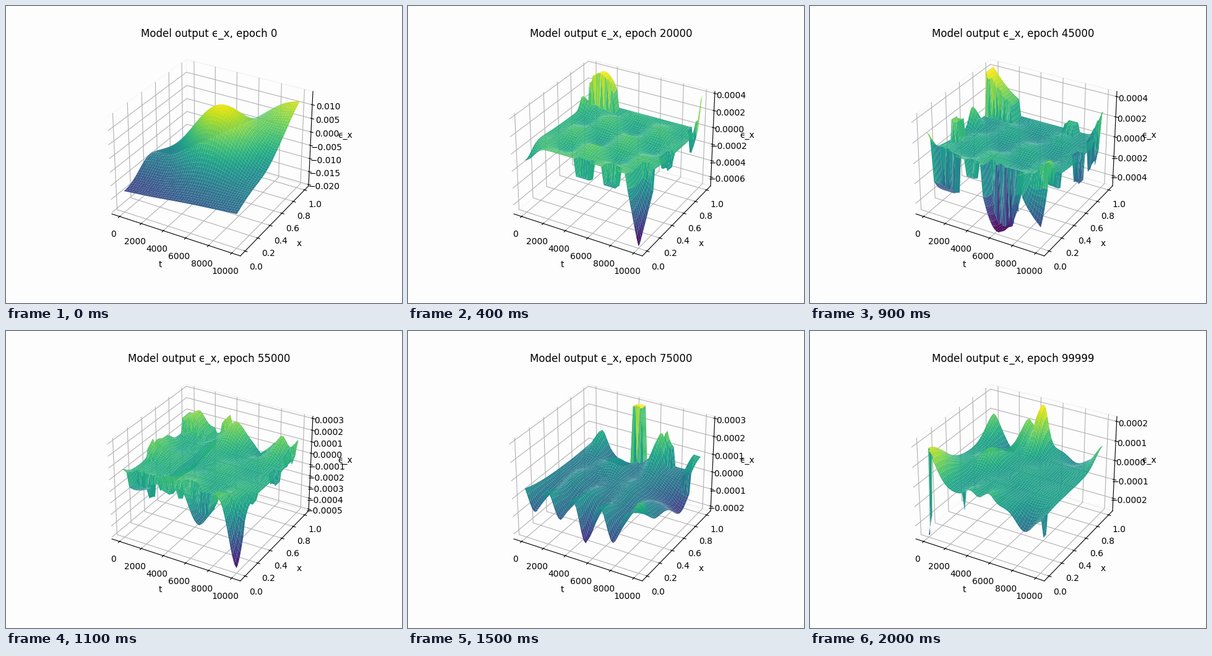
A matplotlib script that plays this animation: 640x480 px, repeating every 2100 ms.

```python
import numpy as np
import matplotlib.pyplot as plt
from matplotlib.animation import FuncAnimation

STEP, LAST, FRAMES = 5000, 99999, 21
PAPER = "#fdfdfd"
N = 51
rng = np.random.default_rng(4)

# a runs along t, b along x, heights span -1 to 1
A, B = np.meshgrid(np.linspace(-1, 1, N), np.linspace(-1, 1, N))
LIP = np.exp(-(B + 1) / 0.5)


def bump(a, b, h, wa=0.2, wb=0.25):
    return h * np.exp(-((A - a) / wa) ** 2 - ((B - b) / wb) ** 2)


def front(a, h, w=0.12):
    return bump(a, -1, h, w, 0.3)


def back(a, h, w=0.12):
    return bump(a, 1, h, w, 0.35)


def ripple(amp):
    calm = (1 - A**4) * (1 - B**4)
    return amp * np.sin(7 * A + 2 * B) * np.cos(6 * B - A) * calm


def wave(amp, crest, period):
    """Swell along t that fades away from the front edge."""
    return amp * np.cos(2 * np.pi * (A - crest) / period) * LIP


def wall(a0, a1, b0, b1):
    """Sheer block with ragged edges, open at the rim of the sheet."""
    jag = rng.uniform(-1, 1, N) * min(0.05, (b1 - b0) / 4)
    low = b0 + jag if b0 > -1 else -2
    high = b1 + jag if b1 < 1 else 2
    return (A >= a0) & (A <= a1) & (B >= low) & (B <= high)


def smooth_start():
    z = -0.25 + 0.45 * A + 0.2 * B + 0.3 * A * B
    z += bump(0, 0.12, 1.15, 0.65, 0.55) + bump(-1, -0.25, 0.38, 0.4, 0.45)
    return z + bump(1, 0, -0.25, 0.4, 0.5) + bump(0.75, 1, 0.22, 0.45, 0.4)


def towers_and_pit():
    z = 0.25 + ripple(0.14) + 0.2 * LIP
    z += bump(-1, 0.7, 0.25, 0.15, 0.1) + bump(-1, -1, -0.35)
    z += wall(-1, -0.5, 0.85, 1) * (0.72 - 6 * (A + 0.75) ** 2)
    z -= wall(0.8, 1, -1, -0.5) * (0.3 + 12 * (A - 0.8) * (-0.5 - B))
    for a in (-0.1, 0.38):
        z -= 0.37 * wall(a, a + 0.25, -1, -0.85)
    z -= 0.25 * wall(0.88, 1, -0.1, 0.1)
    return z - 0.5 * wall(0.88, 0.96, 0.85, 1) + bump(1, 1, 0.75, 0.08, 0.12)


def many_pits():
    z = 0.06 + ripple(0.1) + 0.3 * LIP + bump(-1, -1, 0.35, 0.12, 0.15)
    z += bump(-1, 0.33, 0.4, 0.15, 0.14) + bump(1, 0.95, 0.6, 0.12, 0.2)
    z += bump(1, -0.72, 0.4, 0.2, 0.15)
    z -= 0.8 * wall(-0.9, -0.5, -1, -0.8)
    z -= 0.35 * wall(-0.3, -0.15, -1, -0.85)
    z -= wall(-0.02, 0.6, -1, -0.75) * np.maximum(0, 1.35 - 10 * (A - 0.26) ** 2)
    z -= wall(0.66, 1, -1, -0.75) * np.sqrt(abs(A - 0.6) / 0.4) * (-0.6 - B) * 2.4
    z += wall(-1, -0.5, 0.75, 1) * 0.95 * np.exp(-2 * (A + 1))
    z += 0.42 * wall(-1, -0.88, -0.35, -0.12) + 0.2 * wall(0.4, 0.6, 0.8, 1)
    for b in (-0.5, 0.3, 0.85):
        z -= (0.45 + 0.3 * b) * wall(0.88, 1, b - 0.1, b + 0.08)
    return z


def long_cliff():
    z = 0.3 + ripple(0.04) + front(-0.3, 0.35, 0.3) + front(0.08, 0.45)
    z += front(0.37, -0.25) + front(0.7, 0.4) + front(1, -1.4, 0.16)
    z += bump(-1, 0, 0.4) + back(-0.8, 0.32) + back(-0.12, 0.58, 0.22)
    z += back(0.35, -0.25) + back(0.7, 0.52) + back(1, 0.25)
    z -= 0.3 * wall(-0.53, 0, -1, -0.85) + 0.22 * wall(-0.42, -0.32, -0.85, 0.7)
    return z + 0.33 * wall(-0.32, -0.22, 0.85, 1)


def tall_tower():
    z = -0.15 + ripple(0.06) + wave(0.27, -0.14, 0.46)
    z += front(0.06, -0.35) + front(0.58, -0.15) + front(1, 0.85)
    z += bump(1, 0.35, -0.45, 0.35, 0.35) + bump(-0.25, 0.5, 0.2)
    z += back(-0.8, 0.38) + back(-0.35, -0.25, 0.25) + back(0.3, 0.65)
    z += wall(-0.18, 0, 0.88, 1) * (1.3 - 12 * (A + 0.1) ** 2)
    return z + 0.4 * wall(0.38, 0.54, 0.88, 1) + 0.38 * wall(0.86, 1, 0.65, 1)


def sharp_peaks():
    z = -0.18 + ripple(0.05) + wave(0.35, -0.38, 0.48)
    z += front(0.05, 0.4) + front(-0.12, -0.15) + front(0.92, -0.35, 0.15)
    z += back(-1, 0.75, 0.15) + back(-0.73, -0.35, 0.15) + back(-0.45, 0.6)
    z += back(-0.08, 1.2) + back(0.35, 0.2, 0.15) + back(1, 0.45)
    return z + bump(0.85, 0.6, -0.65, 0.12, 0.15) + bump(-0.6, 0.1, 0.35)


def thin_spikes():
    z = 0.12 + ripple(0.04) + bump(-1, -0.95, 0.72, 0.25, 0.6)
    z += front(0.1, 0.2) + front(-0.22, 0.15) + front(0.72, -0.38, 0.2)
    z += back(-1, 0.4, 0.15) + back(-0.62, -0.3, 0.15) + back(-0.34, 0.5)
    z += back(-0.07, 0.9) + back(0.55, -0.2, 0.2) + back(1, 0.33)
    z += bump(-0.5, 0.1, 0.3)
    z -= wall(-1, -0.9, -1, -0.95) * (1.85 - 7 * (A + 1))
    return z - 0.4 * (wall(-0.34, -0.3, -1, -0.97) + wall(0.97, 1, -0.95, -0.85))


# epoch, lowest and highest output, shape of the sheet
KEYS = [
    (0, -0.0198, 0.0141, smooth_start()),
    (20000, -0.000688, 0.0004, towers_and_pit()),
    (45000, -0.000487, 0.000431, many_pits()),
    (60000, -0.000505, 0.000251, long_cliff()),
    (75000, -0.000217, 0.0003, tall_tower()),
    (85000, -0.000142, 0.00022, sharp_peaks()),
    (LAST, -0.000258, 0.000215, thin_spikes()),
]


def state(epoch):
    k = max(j for j in range(len(KEYS) - 1) if KEYS[j][0] <= epoch)
    (e0, lo0, hi0, z0), (e1, lo1, hi1, z1) = KEYS[k:k + 2]
    u = (epoch - e0) / (e1 - e0)
    lo, hi = lo0 * (lo1 / lo0) ** u, hi0 * (hi1 / hi0) ** u
    return lo, hi, np.clip((1 - u) * z0 + u * z1, -1, 1)


fig = plt.figure(figsize=(6.4, 4.8), dpi=100, facecolor=PAPER)
ax = fig.add_subplot(projection="3d", facecolor=PAPER)


def draw(i):
    epoch = min(i * STEP, LAST)
    lo, hi, z = state(epoch)
    ax.clear()
    ax.plot_surface(5000 * (A + 1), (B + 1) / 2, lo + (hi - lo) * (z + 1) / 2,
                    rstride=1, cstride=1, cmap="viridis", vmin=lo, vmax=hi)
    pad = 0.05 + 1.1 / 48
    ax.set_xlim(-1e4 * pad, 1e4 * (1 + pad))
    ax.set_ylim(-pad, 1 + pad)
    ax.set_zlim(lo - (hi - lo) / 48, hi + (hi - lo) / 48)
    for axis in (ax.xaxis, ax.yaxis, ax.zaxis):
        axis.pane.fill = False
    ax.set_xlabel("t")
    ax.set_ylabel("x")
    ax.set_zlabel("ϵ_x")
    ax.set_title(f"Model output ϵ_x, epoch {epoch}")
    return []


anim = FuncAnimation(fig, draw, frames=FRAMES, interval=1000 // 10,
                     init_func=lambda: [], repeat=True, repeat_delay=0)
plt.show()
```
